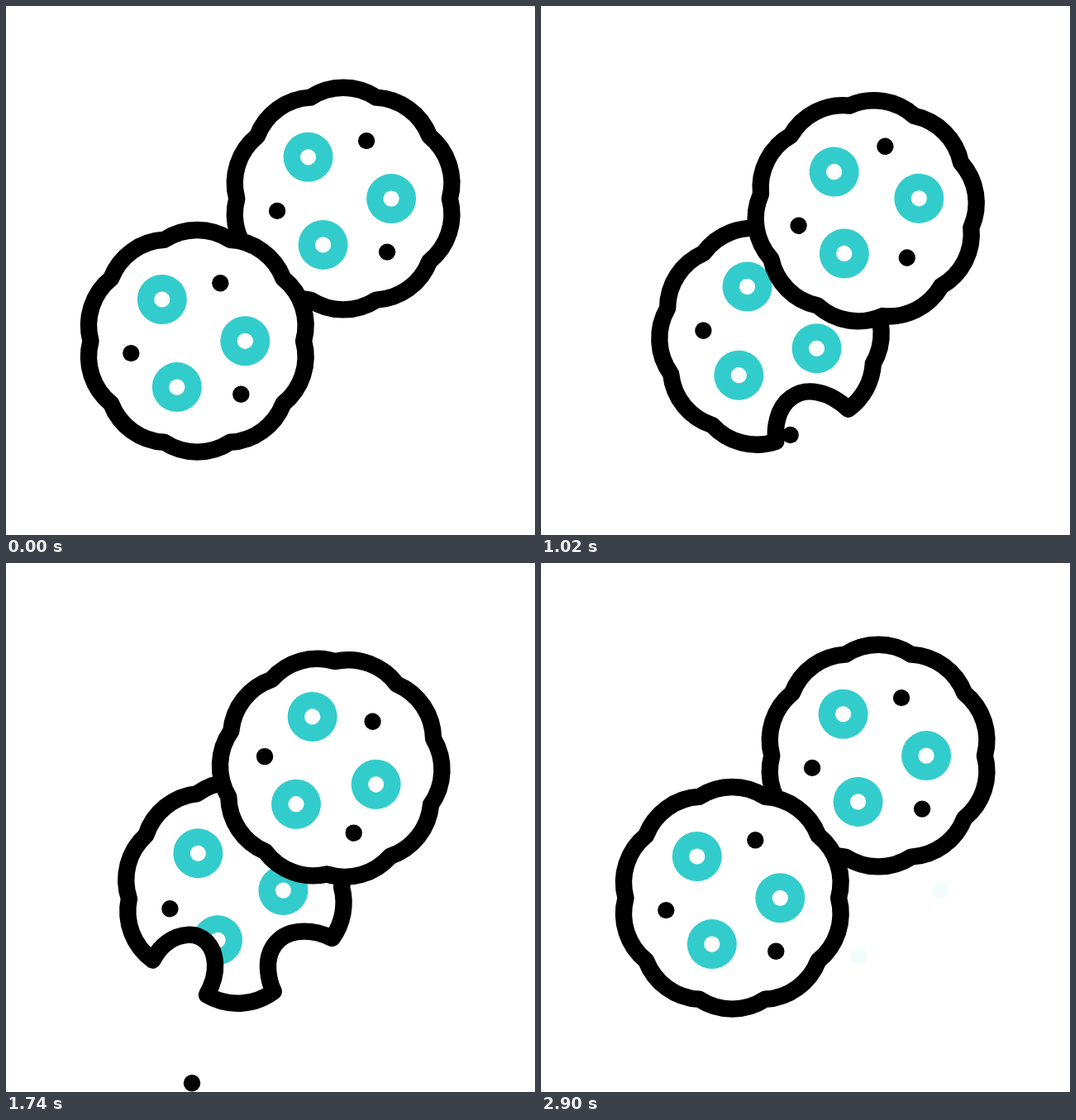
An HTML page with a canvas that plays this animation: 640 by 640 pixels, repeating every 3.54 s.

```html
<!DOCTYPE html>
<html lang="en">
<head>
<meta charset="utf-8">
<title>Cookies</title>
<style>
  html, body { margin: 0; width: 100%; height: 100%; overflow: hidden; background: #fff; }
  canvas { display: block; }
</style>
</head>
<body>
<canvas id="stage" width="640" height="640"></canvas>
<script>
const ctx = document.getElementById('stage').getContext('2d');
const LOOP = 3540, CYAN = '#33cccc', LINE = 20.4;
const SWAP_IN = 400, CLOSE = 2067, SWAP_OUT = 2220;
const BITE_1 = 920, BITE_2 = 1120, DROP_1 = 923, DROP_2 = 1402, REGROW = 1900;

const clamp = x => Math.min(1, Math.max(0, x));
const sine = x => (1 - Math.cos(Math.PI * clamp(x))) / 2;
const easeIn = x => x * x;
const easeOut = x => 1 - (1 - x) ** 2;
const mix = (a, b, p) => a + (b - a) * p;

// Ten scallops between notches; bites replace parts of the rim.
const notch = i => {
  const a = i * Math.PI / 5;
  return (128.8 * Math.cos(a)).toFixed(2) + ',' + (128.8 * Math.sin(a)).toFixed(2);
};
const arcTo = p => ` A73,73 0 0 1 ${p}`;
function rim(bites) {
  let d = 'M' + notch(0);
  for (let i = 1; i <= 10; i++) {
    if (bites > 0 && i === 1) {
      d += arcTo('114,61') + ' C98,52.2 84,50 72,51 C48,53 34,72 34.5,95 C34.7,106 37,115 39.8,121.5';
      i = 2;
    } else if (bites > 1 && i === 3) {
      d += arcTo('-41.2,121.3') + ' C-34,110 -29,98 -29,84 C-29,62 -42,47.5 -60,47.5 C-78,47.5 -94,58 ' + notch(4);
      i = 4;
    } else {
      d += arcTo(notch(i));
    }
  }
  return new Path2D(d + 'Z');
}
const RIMS = [0, 1, 2].map(rim);
const RINGS = [[-42.5, -50.3], [58, 0], [-24.5, 55.8]];
const DOTS = [[28, -70], [-80, 14.8]];
const LOOSE_DOT = [53, 64.5], CRUMB = [-35.6, 99.3];

function dot([x, y], r = 10.2, color = '#000') {
  ctx.fillStyle = color;
  ctx.beginPath();
  ctx.arc(x, y, r, 0, 7);
  ctx.fill();
}

function cookie([x, y], angle, bites, extras) {
  ctx.save();
  ctx.translate(x, y);
  ctx.rotate(angle * Math.PI / 180);
  ctx.fillStyle = '#fff';
  ctx.fill(RIMS[bites]);
  ctx.save();
  ctx.clip(RIMS[bites]);
  for (const ring of RINGS) {
    dot(ring, 30, CYAN);
    dot(ring, 9.6, '#fff');
  }
  ctx.restore();
  for (const p of [...DOTS, ...extras]) dot(p);
  ctx.strokeStyle = '#000';
  ctx.stroke(RIMS[bites]);
  ctx.restore();
}

// Keys are [time, value], eased between neighbours.
function keyed(keys, t) {
  let i = 1;
  while (i < keys.length - 1 && t > keys[i][0]) i++;
  const [t0, a] = keys[i - 1], [t1, b] = keys[i];
  return mix(a, b, sine((t - t0) / (t1 - t0)));
}
const SPIN_LEFT = [[360, 0], [920, 22.3], [1120, 8.1], [1320, 8.6], [1400, 10],
  [1740, -3.1], [2140, -1.2], [2220, 0]];
const SPIN_RIGHT = [[255, 0], [930, 119], [2041, 0]];

const MIDDLE = [319.7, 319.2];
const LEFT = { rest: [231.3, 405.3], hold: [277.5, 399.2], meet: [335, 321] };
const RIGHT = { rest: [408.1, 233.1], hold: [393.2, 247.8], meet: MIDDLE };

// Both cookies slide together, swap order and slide apart again.
function place({ rest, hold, meet }, t) {
  const go = (a, b, p) => [mix(a[0], b[0], p), mix(a[1], b[1], p)];
  if (t < SWAP_IN) return go(rest, MIDDLE, easeIn(clamp((t - 240) / 160)));
  if (t < CLOSE) return go(MIDDLE, hold, easeOut(clamp((t - SWAP_IN) / 160)));
  if (t < SWAP_OUT) return go(hold, meet, easeIn((t - CLOSE) / (SWAP_OUT - CLOSE)));
  return go(MIDDLE, rest, easeOut(clamp((t - SWAP_OUT) / 160)));
}

// Each ray: start x, y, end x, y, opacity left at the end.
const RAYS = [
  [121, 479.3, 85.2, 486.5, 0.06],
  [153.8, 500.7, 122.9, 543, 0],
  [183.4, 526, 183.4, 566, 0.06]
];
function burst(u) {
  if (u <= 0) return;
  const head = sine(u / 0.62), tail = sine((u - 0.3) / 0.7);
  ctx.strokeStyle = CYAN;
  for (const [x0, y0, x1, y1, left] of RAYS) {
    ctx.globalAlpha = mix(1, left, clamp((u - 0.75) / 0.25));
    ctx.beginPath();
    ctx.moveTo(mix(x0, x1, tail), mix(y0, y1, tail));
    ctx.lineTo(mix(x0, x1, head) + 0.01, mix(y0, y1, head));
    ctx.stroke();
  }
  ctx.globalAlpha = 1;
}

function draw(t) {
  ctx.fillStyle = '#fff';
  ctx.fillRect(0, 0, 640, 640);
  ctx.lineWidth = LINE;
  ctx.lineCap = ctx.lineJoin = 'round';

  const swapped = t >= SWAP_IN && t < SWAP_OUT;
  const bites = !swapped || t < BITE_1 ? 0 : t < BITE_2 ? 1 : 2;
  const extras = [];
  if (t < DROP_1 || t > REGROW) extras.push(LOOSE_DOT);
  if (t >= BITE_2 && t < DROP_2) extras.push(CRUMB);

  const left = () => cookie(place(LEFT, t), keyed(SPIN_LEFT, t), bites, extras);
  const right = () => cookie(place(RIGHT, t), keyed(SPIN_RIGHT, t), 0, [LOOSE_DOT]);
  for (const part of swapped ? [left, right] : [right, left]) part();

  const fall = 0.408;
  if (t >= DROP_1) dot([301.7, 479 + fall * (t - DROP_1)]);
  if (t >= DROP_2) dot([225, 491 + fall * (t - DROP_2)]);

  if (t < 1513) burst((t - 1113) / 400);
  ctx.save();
  ctx.translate(568, -90.5);
  ctx.scale(-1, 1);
  burst(clamp((t - 2490) / 400));
  ctx.restore();
}

const begin = performance.now();
function tick() {
  draw((performance.now() - begin) % LOOP);
  requestAnimationFrame(tick);
}
tick();
</script>
</body>
</html>
```
